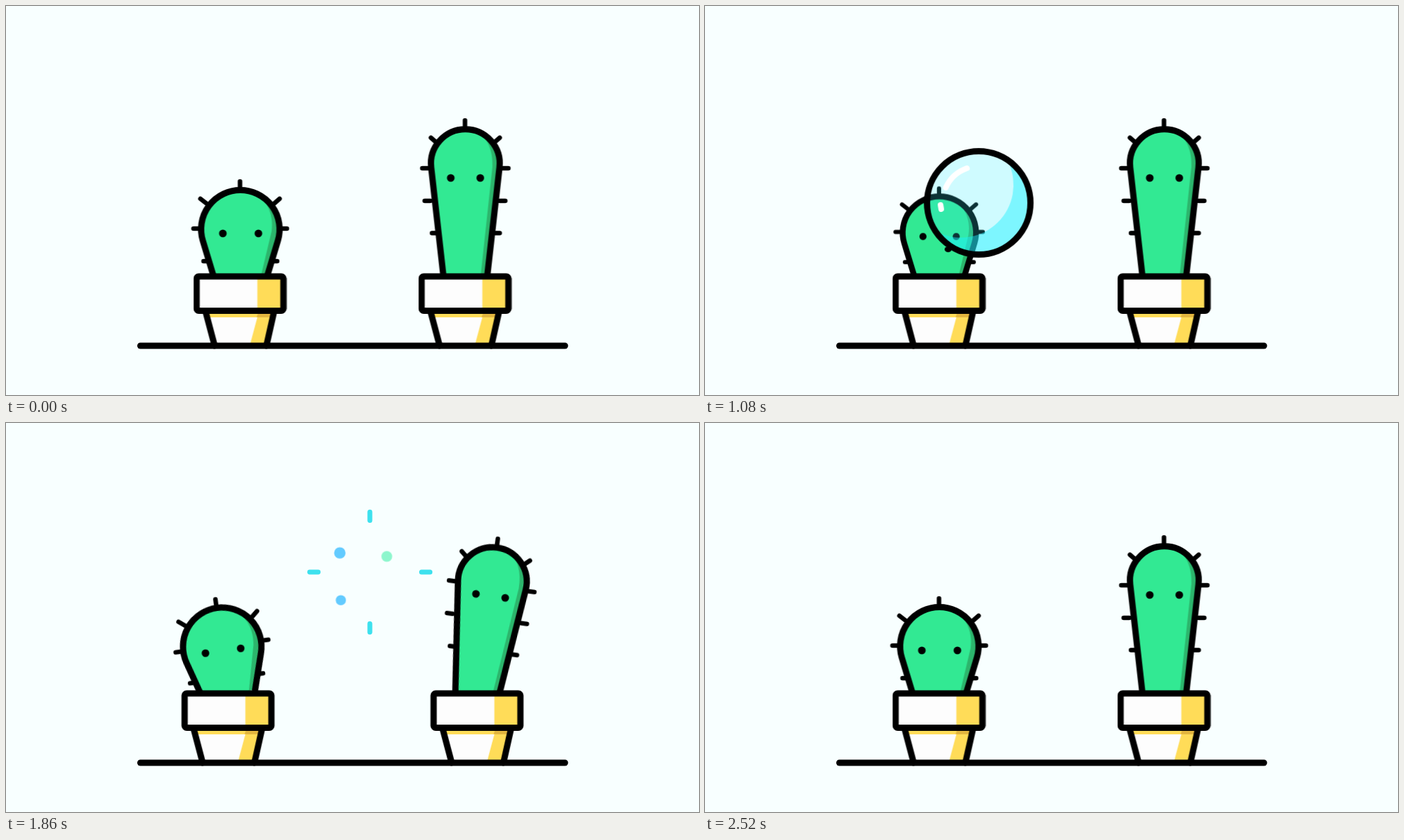
These frames come from a looping animation (998x561 px, 2.55 s). An HTML page:

```html
<!DOCTYPE html>
<html lang="en">
<head>
<meta charset="utf-8">
<title>Cactus bubble</title>
<style>
html, body { margin: 0; width: 100%; height: 100%; overflow: hidden; background: #f8ffff; }
svg { display: block; width: 100vw; height: 100vh; }

.line { fill: none; stroke: #000; stroke-width: 9; stroke-linejoin: round; stroke-linecap: round; }
.spikes { stroke-width: 6.5; }
.body { fill: #32e993; }
.shade { fill: #2cb56c; }
.yellow { fill: #ffdc58; }
.white { fill: #fdfdfd; }

.sway, .tilt, .breathe, .mouth, .float, .grow, .dash, .dot {
  animation: 2550ms cubic-bezier(.37, 0, .63, 1) infinite;
}
.sway { animation-name: sway; }
.tilt { animation-name: tilt; }
.breathe { animation-name: breathe; }
.mouth { animation-name: mouth; }
.float { animation-name: float; animation-timing-function: linear; }
.grow { animation-name: grow; }
.dash {
  animation-name: dash; animation-timing-function: linear;
  stroke: #3ee1ee; stroke-width: 7; stroke-linecap: round;
}
.dot { animation-name: dot; animation-timing-function: ease-out; }

/* --d is the outward direction of each plant */
@keyframes sway {
  0%, 69.41%, 95.3%, 100% { transform: translateX(0); }
  74.12% { transform: translateX(calc(var(--d) * 20px)); }
  79.41% { transform: translateX(calc(var(--d) * -11px)); }
  87.84% { transform: translateX(calc(var(--d) * 6.6px)); }
}
@keyframes tilt {
  0%, 69.41%, 95.3%, 100% { transform: translateY(0) rotate(0deg); }
  74.12% { transform: translateY(0) rotate(calc(var(--d) * 9deg)); }
  79.41% { transform: translateY(-2px) rotate(calc(var(--d) * -4.7deg)); }
  87.84% { transform: translateY(0) rotate(calc(var(--d) * 3deg)); }
}
@keyframes breathe {
  0%, 5.88%, 54.9%, 100% { transform: scale(1, 1); }
  20%, 22.35% { transform: scale(1.18, 1.245); }
  32.94% { transform: scale(.964, .973); }
  42.35% { transform: scale(.935, .925); }
  48.63% { transform: scale(1.065, 1.065); }
}
@keyframes mouth {
  0%, 23.5% { transform: translate(5.5px, -37px) scale(0); }
  26.47%, 30.6% { transform: translate(6px, -37px) scale(1); }
  42.35% { transform: translate(13.5px, -39px) scale(.9); }
  44%, 100% { transform: translate(13.5px, -39px) scale(0); }
}
@keyframes float {
  0%, 26.47% { transform: translate(343px, 351px); }
  42.35% { transform: translate(351px, 350px); }
  69.33%, 100% { transform: translate(481.2px, 281.2px); }
}
@keyframes grow {
  0% { transform: scale(0); }
  26.47% { transform: scale(0); animation-timing-function: cubic-bezier(.333, .75, .667, 1); }
  42.35%, 69.33% { transform: scale(1); }
  69.34%, 100% { transform: scale(0); }
}
@keyframes dash {
  0%, 69.4% { opacity: 0; stroke-dasharray: 0 200; stroke-dashoffset: 0; }
  69.41% { opacity: 1; stroke-dasharray: 0 200; stroke-dashoffset: 0; }
  74.12% { stroke-dasharray: 16 200; stroke-dashoffset: -32.3; }
  78.82% { stroke-dasharray: 16 200; stroke-dashoffset: -57.5; }
  83.52% { opacity: 1; stroke-dasharray: .1 200; stroke-dashoffset: -80; }
  83.53%, 100% { opacity: 0; stroke-dasharray: 0 200; stroke-dashoffset: -80; }
}
@keyframes dot {
  0%, 69.4% { transform: translate(calc(var(--x) * .4), calc(var(--y) * .4)) scale(0); }
  69.41% { transform: translate(calc(var(--x) * .4), calc(var(--y) * .4)) scale(.7); }
  78.82% { transform: translate(var(--x), var(--y)) scale(1); }
  84.5%, 100% { transform: translate(calc(var(--x) * 1.1), calc(var(--y) * 1.1)) scale(0); }
}
</style>
</head>
<body>
<svg viewBox="0 0 998 561" preserveAspectRatio="none">
  <defs>
    <g id="pot">
      <path class="white" d="M-50 54L-37 103H37.5L48.5 54Z"/>
      <path class="yellow" d="M-46 54H46V62H-46ZM25 60L13.5 103H37.5L47 60Z"/>
      <path d="M25.5 55H44V62H23.5Z" fill="#e2b53f"/>
      <path class="line" d="M-50 54L-37 103M48.5 54L37.5 103"/>
      <rect class="white" x="-63" y="3" width="125" height="49.5"/>
      <rect class="yellow" x="24.5" y="3" width="37" height="49.5"/>
      <rect class="line" x="-63" y="3" width="125" height="49.5" rx="3"/>
    </g>
  </defs>

  <g class="sway" style="--d:-1">
    <g transform="translate(337.5 387)">
      <g class="tilt">
        <g class="breathe">
          <path class="line spikes" d="M-.5-134v11M-57.5-109l9 7M56.5-109l-8 7M-67.5-66h9M67-66h-9M-53-19h7M53-19h-7"/>
          <path class="body" d="M-38.5 3L-54.1-48.7A56.5 56.5 0 1 1 54.1-48.7L38.5 3Z"/>
          <path class="shade" d="M14.5-119.6C36-113 49-88 45-62L29.5 3H38.5L54.1-48.7A56.5 56.5 0 0 0 14.5-119.6Z"/>
          <path class="line" d="M-38.5 3L-54.1-48.7A56.5 56.5 0 1 1 54.1-48.7L38.5 3"/>
          <circle cx="-25.2" cy="-59" r="5.5"/>
          <circle cx="26" cy="-59" r="5.5"/>
          <ellipse class="mouth" rx="6" ry="5"/>
        </g>
      </g>
      <use href="#pot"/>
    </g>
  </g>

  <g class="sway" style="--d:1">
    <g transform="translate(661.5 387)">
      <g class="tilt">
        <path class="line spikes" d="M-.5-222v12M-49.5-197l8 7M49.5-197l-8 7M-62-153h10M62-153h-10M-58.5-106h8M57.5-106h-8M-48-59.5h6M49.5-59.5h-6"/>
        <path class="body" d="M-31.5 3L-49.2-154.3A49.5 49.5 0 1 1 49.2-154.3L31.5 3Z"/>
        <path class="shade" d="M15-207.2C33-197 40-177 39-155L22 3H31.5L49.2-154.3A49.5 49.5 0 0 0 15-207.2Z"/>
        <path class="line" d="M-31.5 3L-49.2-154.3A49.5 49.5 0 1 1 49.2-154.3L31.5 3"/>
        <circle cx="-21" cy="-139" r="5.5"/>
        <circle cx="21.5" cy="-139" r="5.5"/>
      </g>
      <use href="#pot"/>
    </g>
  </g>

  <path class="line" d="M193.5 490H805"/>

  <g class="float">
    <g class="grow">
      <g transform="translate(43 -66)">
        <circle r="72" fill="#3aeaff" fill-opacity=".21"/>
        <path d="M43.1-57.7A72 72 0 1 1-57.7 43.1A76 76 0 0 0 43.1-57.7Z" fill="#19f0ff" fill-opacity=".45"/>
        <path d="M-47.5-22A53 53 0 0 1-17-50M-55 3L-54 9" fill="none" stroke="#fff" stroke-width="8" stroke-linecap="round"/>
        <circle class="line" r="74.5"/>
      </g>
    </g>
  </g>

  <g transform="translate(524 215)">
    <line class="dash" x1="50" x2="132"/>
    <line class="dash" x1="50" x2="132" transform="rotate(90)"/>
    <line class="dash" x1="50" x2="132" transform="rotate(180)"/>
    <line class="dash" x1="50" x2="132" transform="rotate(270)"/>
    <circle class="dot" r="9.5" fill="#63cbff" style="--x:-59.5px;--y:-38px"/>
    <circle class="dot" r="8.5" fill="#63cbff" style="--x:-57.5px;--y:55.7px"/>
    <circle class="dot" r="9" fill="#8df6cd" style="--x:33.5px;--y:-31px"/>
  </g>
</svg>
</body>
</html>
```
